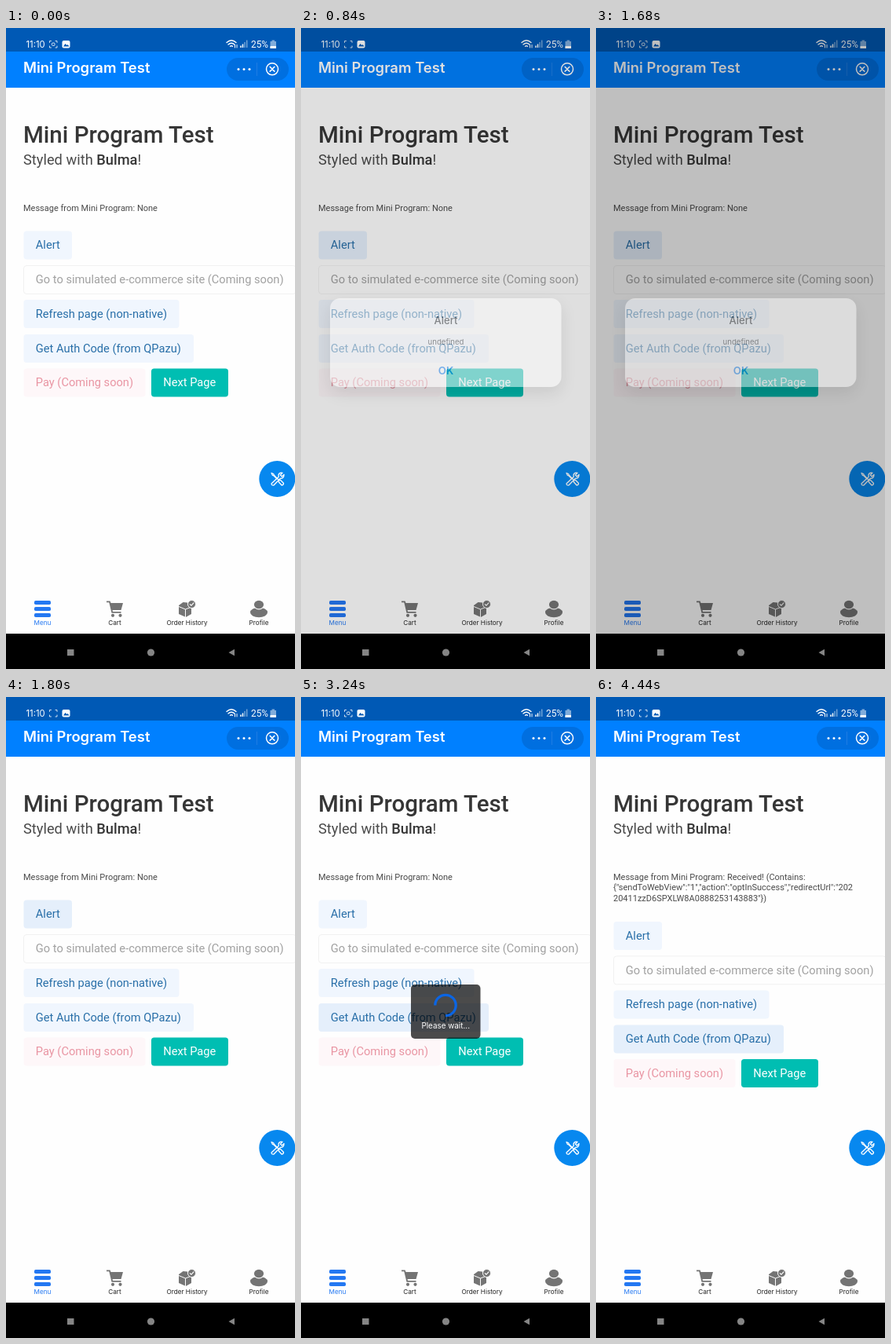
Animation of 368x816 px, one loop 4.56 s. Source, as an HTML page:

```html
<!DOCTYPE html>
<html lang="en">
<head>
<meta charset="utf-8">
<title>Mini Program Test</title>
<style>
  html, body { margin: 0; width: 100%; height: 100%; overflow: hidden; background: #000; }
  svg { display: block; width: 368px; height: 816px; }
  text { font-family: Roboto, sans-serif; white-space: pre; }
  .ui text, text.ui { font-family: Inter, sans-serif; }
  .mid { text-anchor: middle; }
  .line { fill: none; stroke: #fff; stroke-linecap: round; stroke-linejoin: round; }
  #buttons text { font-size: 14.65px; }
  #message { font-size: 11px; fill: #4a4a4a; }
  #dialog rect { filter: drop-shadow(0 8px 10px rgba(0, 0, 0, .18)); }
</style>
</head>
<body>
<svg viewBox="0 0 368 816">
  <rect width="368" height="816" fill="#fefefe"/>

  <!-- status bar and header -->
  <rect width="368" height="30" fill="#0059b5"/>
  <rect y="30" width="368" height="46" fill="#0080ff"/>
  <text x="312" y="24.500" font-size="11.900" fill="#fff">25%</text>
  <g class="ui" fill="#fff">
    <text x="25.500" y="24.500" font-size="11.300">11:10</text>
    <text x="22" y="57.300" font-size="18.450" font-weight="600">Mini Program Test</text>
  </g>
  <path class="line" stroke-width="1" opacity=".8" d="M55.500 18.500V16.500H57.500M63 16.500H65V18.500M65 23V25H63M57.500 25H55.500V23"/>
  <rect id="recording" x="58.500" y="19" width="3.500" height="3.500" rx="1" fill="none" stroke="#fff" opacity=".8"/>
  <rect x="71.500" y="16" width="10" height="9.500" rx="2" fill="#fff"/>
  <path d="M73 23.500L75.500 20L77.500 22L78.500 21L80.500 23.500Z" fill="#0059b5"/>
  <path class="line" stroke-width="1.400" d="M281 18.500Q287 13 293 18.500M283 21Q287 17.500 291 21M285.500 23.300Q287 22 288.500 23.300"/>
  <path class="line" stroke-width="1" d="M291.500 25V21.500M294 21.500V25"/>
  <path d="M299 25V22.500M301.500 25V20.500" stroke="#fff" stroke-width="1.500"/>
  <path d="M304 25V18M306.700 25V15.500" stroke="#fff" stroke-opacity=".45" stroke-width="1.500"/>
  <path d="M338.500 15.500H342V17H344V26H336.500V17H338.500Z" fill="#fff" opacity=".5"/>
  <path d="M336.500 23H344V26H336.500Z" fill="#fff"/>
  <rect x="281" y="38" width="79" height="29" rx="14.500" fill="#006fe0"/>
  <g fill="#fff"><circle cx="296" cy="52.500" r="1.500"/><circle cx="303" cy="52.500" r="1.500"/><circle cx="310" cy="52.500" r="1.500"/></g>
  <path d="M319.500 44V61" stroke="#1f7de3"/>
  <circle class="line" cx="339" cy="52.300" r="7.500" stroke-width="1.500"/>
  <path class="line" stroke-width="1.700" d="M336.200 49.500L341.800 55.100M341.800 49.500L336.200 55.100"/>

  <!-- page -->
  <text x="22" y="146" font-size="29.500" font-weight="500" fill="#363636">Mini Program Test</text>
  <text x="22" y="174" font-size="18.300" fill="#4a4a4a">Styled with <tspan font-weight="500" fill="#363636">Bulma</tspan>!</text>
  <text id="message"></text>
  <g id="buttons"></g>
  <g id="pageTouch"></g>

  <!-- floating tools button -->
  <circle cx="345.300" cy="574" r="23" fill="#0788ef"/>
  <g class="line" stroke-width="1.300">
    <path d="M338 566.500L340.500 567.500L341.500 569.500L346.500 574.500M338 566.500L339.300 569.300L341 570L345 574M347.500 575.500L349.500 575.500L353.500 579.500Q353.500 582 351 582L347.300 578Z"/>
    <path d="M352 566.300Q348 565.500 347 569Q347 570.500 347.300 571.300L338 580Q338 582.500 341 582L349.500 573.300Q354 573.500 354 568.500L351.300 571L349.300 569Z"/>
  </g>

  <!-- tab bar -->
  <g fill="#2478f2">
    <rect x="36" y="729" width="21" height="5" rx="1.800"/>
    <rect x="36" y="737" width="21" height="5" rx="1.800"/>
    <rect x="36" y="745" width="21" height="5" rx="1.800"/>
  </g>
  <g fill="#747474">
    <path d="M128 729.500H132.500L133.500 732H149L146.500 741H135.500L136 743H146.500V744.800H134.500L131.300 731.300H128Z"/>
    <circle cx="136" cy="747.800" r="2.100"/><circle cx="145.500" cy="747.800" r="2.100"/>
    <path d="M220 735L225.500 731L231 731.500V734L236 739V746L229 750L220 746Z"/>
    <path d="M220 736.500L228.500 740V750M228.500 740L236 737" stroke="#fefefe" fill="none"/>
    <circle cx="236.500" cy="733.500" r="5" stroke="#fefefe"/>
    <path class="line" stroke-width="1.200" d="M234.300 733.600L236 735.200L238.900 731.900"/>
    <ellipse cx="322" cy="744" rx="11" ry="6.200"/>
    <ellipse cx="322" cy="734" rx="6.700" ry="5.800" stroke="#fefefe" stroke-width="1.200"/>
  </g>
  <g class="ui mid" font-size="8.200" fill="#222">
    <text x="46.500" y="759.500" fill="#2478f2">Menu</text>
    <text x="138.500" y="759.500">Cart</text>
    <text x="230.500" y="759.500">Order History</text>
    <text x="322" y="759.500">Profile</text>
  </g>

  <!-- layers above the page -->
  <rect id="shade" width="368" height="771"/>
  <g id="dialog" class="ui mid">
    <rect x="37" y="344" width="294.500" height="113" rx="13" fill="#fff"/>
    <text x="184.500" y="377" font-size="13" font-weight="500" fill="#333">Alert</text>
    <text x="184.500" y="403" font-size="9.600" fill="#444">undefined</text>
    <text x="184.500" y="441" font-size="13.200" font-weight="600" fill="#1081f5">OK</text>
  </g>
  <circle id="dialogTouch" cx="231.300" cy="430.500" r="10.800" fill="#fbfbfd" stroke="#d5d5e3" stroke-width="1.500"/>
  <g id="loader">
    <rect x="140" y="366" width="88.500" height="69" rx="5" fill="#000" fill-opacity=".7"/>
    <path id="spinner" d="M170.800 392.500A13.200 13.200 0 1 1 184 405.700" fill="none" stroke="#0b65e3" stroke-width="3.300"/>
    <text class="ui mid" x="184.200" y="422" font-size="9.900" fill="#fff">Please wait...</text>
  </g>

  <!-- system navigation -->
  <rect y="771" width="368" height="45"/>
  <g fill="#858585">
    <rect x="78" y="791" width="8.500" height="8"/>
    <circle cx="184.500" cy="795" r="4.600"/>
    <path d="M283.500 795L291 790.700V799.300Z"/>
  </g>
</svg>
<script>
const LOOP = 4560, STEP = 120;
const el = id => document.getElementById(id);
const between = (t, from, to) => t >= from && t < to;
const show = (id, visible) => el(id).style.display = visible ? '' : 'none';

const LINK = { fill: '#f0f6fe', color: '#296fa8' };
const PRESSED_FILL = '#e5effb';
const BUTTONS = [
  { label: 'Alert', x: 22.5, y: 258.5, w: 61.5, ...LINK },
  { label: 'Go to simulated e-commerce site (Coming soon)', x: 22.5, y: 302.5, w: 347, fill: '#fefefe', color: '#a1a1a1', stroke: '#f1f1f1' },
  { label: 'Refresh page (non-native)', x: 22.5, y: 346, w: 198, ...LINK },
  { label: 'Get Auth Code (from QPazu)', x: 22.5, y: 390, w: 216.5, ...LINK },
  { label: 'Pay (Coming soon)', x: 22.5, y: 433.5, w: 155, fill: '#fef7f9', color: '#e995a3' },
  { label: 'Next Page', x: 185, y: 433.5, w: 98, fill: '#00beb2', color: '#fff' },
];
const RECEIVED = [
  'Message from Mini Program: Received! (Contains:',
  '{"sendToWebView":"1","action":"optInSuccess","redirectUrl":"202',
  '20411zzD6SPXLW8A0888253143883"})',
];

// [start, shade opacity, dialog opacity]
const DIALOG_STEPS = [
  [0, 0, 0], [840, .12, .5], [960, .4, .9], [1080, .57, 1],
  [1200, .6, 1], [1680, .25, .45], [1800, 0, 0],
];

el('buttons').innerHTML = BUTTONS.map(b => `
  <rect x="${b.x}" y="${b.y}" width="${b.w}" height="36" rx="3.7" fill="${b.fill}" stroke="${b.stroke || 'none'}"/>
  <text x="${b.x + 15.3}" y="${b.y + 22.8}" fill="${b.color}">${b.label}</text>`).join('');
const faces = el('buttons').querySelectorAll('rect');

function setMessage(received) {
  const lines = received ? RECEIVED : ['Message from Mini Program: None'];
  el('message').innerHTML = lines.map((line, i) =>
    `<tspan x="22" y="${232.7 + i * 13.7}">${line}</tspan>`).join('');
  el('buttons').setAttribute('transform', `translate(0 ${received ? 27.4 : 0})`);
}

function touch(button, cx, cy) {
  return `<rect x="${button.x}" y="${button.y}" width="${button.w}" height="36" fill="#33adf2" fill-opacity=".5"/>
    <circle cx="${cx}" cy="${cy}" r="10" fill="#c9e0f0" fill-opacity=".55" stroke="#b5d5ea"/>`;
}

function render(t) {
  const [, shade, dialog] = DIALOG_STEPS.findLast(s => t >= s[0]);
  el('shade').style.opacity = shade;
  el('dialog').style.opacity = dialog;
  show('dialogTouch', between(t, 1320, 1680));

  const alertDown = between(t, 720, 840), authDown = between(t, 2400, 2640);
  el('pageTouch').innerHTML = alertDown ? touch(BUTTONS[0], 53, 277)
    : authDown ? touch(BUTTONS[3], 64.5, 408) : '';
  faces[0].setAttribute('fill', between(t, 720, 2400) ? PRESSED_FILL : LINK.fill);
  faces[3].setAttribute('fill', t >= 2400 ? PRESSED_FILL : LINK.fill);

  show('loader', between(t, 2760, 3960));
  el('spinner').setAttribute('transform', `rotate(${(t - 3240) * .36} 184 392.5)`);
  show('recording', !(between(t, 840, 1200) || between(t, 1800, 2160) || between(t, 2760, 3120) || t >= 4440));
  setMessage(t >= 3960);
}

let last = -1;
function tick() {
  const t = Math.floor(performance.now() % LOOP / STEP) * STEP;
  if (t !== last) render(last = t);
  requestAnimationFrame(tick);
}
tick();
</script>
</body>
</html>
```
